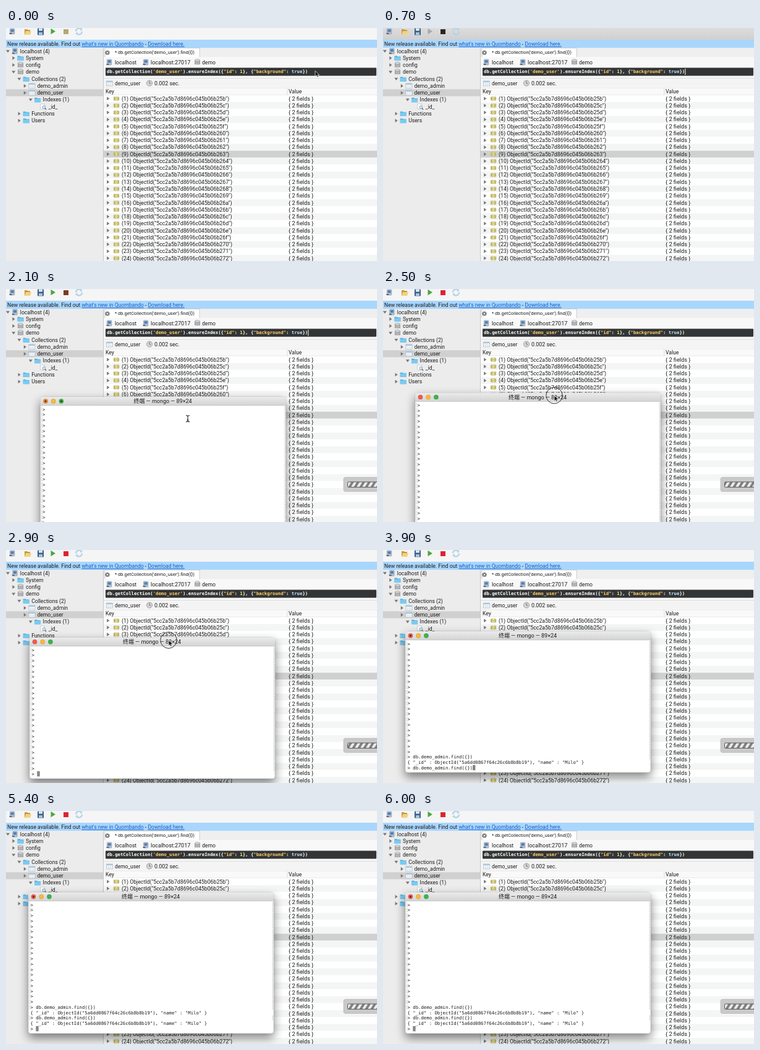
An HTML page that plays this animation: 600x378 px, repeating every 6.1 s.

```html
<!DOCTYPE html>
<html lang="en">
<head>
<meta charset="utf-8">
<style>
html, body { margin: 0; width: 100%; height: 100%; overflow: hidden; background: #fff; }
svg { display: block; width: 600px; height: 378px; }
text { font-family: Roboto, "Noto Sans CJK SC", "Noto Sans CJK", sans-serif; font-size: 8.6px; fill: #1c1c1c; white-space: pre; }
.mono { font-family: "DejaVu Sans Mono", monospace; font-size: 7.3px; }
.code { font-weight: bold; fill: #fff; }
.link { fill: #1560c8; text-decoration: underline; }
</style>
</head>
<body>
<svg id="stage" viewBox="0 0 600 378" xmlns="http://www.w3.org/2000/svg">
  <defs>
    <linearGradient id="bar" x2="0" y2="1"><stop stop-color="#ebebeb"/><stop offset="1" stop-color="#d3d3d3"/></linearGradient>
    <linearGradient id="active" x2="0" y2="1"><stop stop-color="#dcdcdc"/><stop offset="1" stop-color="#d0d0d0"/></linearGradient>
    <filter id="shadow" x="-20%" y="-20%" width="140%" height="150%"><feGaussianBlur stdDeviation="8"/></filter>
    <clipPath id="track"><rect x="552.5" y="313" width="60" height="8.5" rx="1.5"/></clipPath>
  </defs>
  <g id="app"></g>
  <g id="progress">
    <rect x="546" y="305.5" width="70" height="23" rx="3" fill="#c9c9c9" stroke="#b5b5b5" stroke-width=".7"/>
    <g clip-path="url(#track)">
      <rect x="552" y="312" width="60" height="11" fill="#ececec"/>
      <g id="stripes"></g>
    </g>
    <rect x="552.5" y="313" width="60" height="8.5" rx="1.5" fill="none" stroke="#5a5a5a"/>
  </g>
  <g id="term"></g>
  <g id="ibeam" fill="none" stroke="#222" stroke-width="1.1">
    <path d="M-3-5Q0-5 0-3Q0-5 3-5M0-3V4M-3 5.5Q0 5.5 0 3.5Q0 5.5 3 5.5M-1.5 2.5H1.5"/>
  </g>
  <g id="arrow">
    <circle id="ring" r="13.2" fill="none" stroke="#333" stroke-width="1"/>
    <path d="M0 0V9.2L2.2 7.2L3.6 10.4L5.2 9.7L3.8 6.6H6.7Z" fill="#111" stroke="#fff" stroke-width=".7"/>
  </g>
</svg>
<script>
const $ = id => document.getElementById(id);
const LOOP = 6100, PITCH = 11.26;

const rect = (x, y, w, h, fill, extra = '') =>
  `<rect x="${x}" y="${y}" width="${w}" height="${h}" fill="${fill}" ${extra}/>`;
const path = (d, fill, extra = '') => `<path d="${d}" fill="${fill}" ${extra}/>`;
const label = (x, y, s, size = 8.6, extra = '') =>
  `<text x="${x}" y="${y}" style="font-size:${size}px" ${extra}>${s}</text>`;
const at = (x, y, body) => `<g transform="translate(${x} ${y})">${body}</g>`;

// icons are drawn around their centre
const icon = {
  folder: () => path('M-5-3.5H-1L0-2.5H5V4H-5Z', '#55b4e6') + rect(-5, -1.5, 10, 5.5, '#7ccaf0'),
  host: () => rect(-3.6, -4.5, 7.5, 9, '#b4bfca', 'rx="1" stroke="#7d8894" stroke-width=".5"') +
    rect(-2.4, -3.2, 5, 4, '#4b80bd') + rect(-4.5, 2.5, 4, 2, '#566a80'),
  db: () => rect(-4, -3.2, 8, 7, '#c4c7c9') +
    '<ellipse cy="-3.2" rx="4" ry="1.5" fill="#e2e4e5" stroke="#777" stroke-width=".6"/>' +
    path('M-4-.5Q0 1.3 4-.5M-4 2Q0 3.8 4 2M-4-3V3.5M4-3V3.5', 'none', 'stroke="#777" stroke-width=".6"'),
  table: () => rect(-5, -4, 10, 8, '#fff', 'stroke="#a9b5bf" stroke-width=".7"') +
    rect(-5, -4, 10, 2.3, '#a5c8e4') +
    path('M-5 .5H5M-5 2.3H5M-1.7-1.7V4M1.7-1.7V4', 'none', 'stroke="#c4ced6" stroke-width=".5"'),
  index: () => rect(-4.5, -4.5, 6.5, 8, '#fff', 'stroke="#b0b7bd" stroke-width=".6"') +
    '<circle cx="1" cy=".8" r="2.4" fill="#d9eaf6" stroke="#6f8ea6" stroke-width=".8"/>' +
    path('M2.8 2.6L4.8 4.6', 'none', 'stroke="#555" stroke-width="1.2"'),
  doc: () => rect(-4.5, -2.8, 9, 5.6, '#ebe49a', 'rx="1" stroke="#a69f55" stroke-width=".5"') +
    path('M-1.8-1.7H-2.8V1.7H-1.8M1.8-1.7H2.8V1.7H1.8M-.7 0H.7', 'none', 'stroke="#6d6830" stroke-width=".7"'),
  clock: () => '<circle r="4.6" fill="#d4d4d4" stroke="#999" stroke-width=".9"/>' +
    path('M0-3V0L2 1', 'none', 'stroke="#555" stroke-width=".9"')
};
const put = (name, x, y) => at(x, y, icon[name]());
const twist = (x, y, open) =>
  at(x, y, path(open ? 'M-3-1.8H3L0 2.3Z' : 'M-1.8-3L2.3 0L-1.8 3Z', '#777'));

function toolbar() {
  return rect(0, 0, 600, 19, '#f5f5f5', 'id="tools"') +
    at(10, 5.5, icon.host()) +
    at(35, 6, path('M-5-4H-1L0-3H4V5H-5Z', '#c9983f') + path('M-5 5L-3-1H6L4 5Z', '#f2d27c')) +
    at(56, 6, rect(-5, -5.5, 10, 11, '#3c5f86', 'rx="1"') + rect(-3, -5.5, 6, 4, '#dfe9f2') + rect(-3, 1, 6, 4.5, '#a8c3dc')) +
    path('M72.5 .8L80 5.5L72.5 10.2Z', '#4aa83f', 'id="play"') +
    rect(93, 2, 8, 8, '#b5a874', 'id="stop"') +
    at(118, 5.5, path('M-5 0A5 5 0 0 1 3-4M5 0A5 5 0 0 1-3 4', 'none', 'stroke="#b3d3e8" stroke-width="2.2"') +
      path('M1-5.5L6-4L3-.5ZM-1 5.5L-6 4L-3 .5Z', '#b3d3e8')) +
    rect(0, 19, 600, 13.5, '#a9d6fd') +
    `<text x="2" y="29">New release available. Find out <tspan class="link">what's new in Quombando</tspan> - <tspan class="link">Download here.</tspan></text>`;
}

function tree() {
  // depth, open state (0 none, 1 closed, 2 open), icon, text
  const items = [
    [0, 2, 'host', 'localhost (4)'], [1, 1, 'folder', 'System'], [1, 1, 'db', 'config'],
    [1, 2, 'db', 'demo'], [2, 2, 'folder', 'Collections (2)'], [3, 1, 'table', 'demo_admin'],
    [3, 1, 'table', 'demo_user'], [4, 2, 'folder', 'Indexes (1)'], [5, 0, 'index', '_id_'],
    [2, 1, 'folder', 'Functions'], [2, 1, 'folder', 'Users']
  ];
  return rect(0, 32.5, 157.5, 346, '#ececec') + rect(0, 99.4, 157.5, 11.2, '#d0d0d0') +
    items.map(([d, open, name, s], i) => {
      const x = 3 + d * 9.2, y = 37.6 + i * PITCH;
      return (open ? twist(x, y, open > 1) : '') + put(name, x + 11.3, y) + label(x + 19.8, y + 3, s);
    }).join('') + rect(157, 32.5, 1, 346, '#c6c6c6');
}

function editor() {
  const str = s => `<tspan fill="#fed16d">${s}</tspan>`;
  return rect(158, 32.5, 442, 14.5, '#efefef') +
    rect(160, 32.5, 153, 15, '#fff', 'stroke="#bdbdbd" stroke-width=".7"') +
    at(164, 40, '<circle r="3.6" fill="#777"/>' + path('M-1.5-1.5L1.5 1.5M1.5-1.5L-1.5 1.5', 'none', 'stroke="#fff"')) +
    label(176, 42, "* db.getCollection('demo_user').find({})", 7.5) +
    rect(158, 47, 442, 34, '#f8f8f8') +
    put('host', 167, 55.5) + label(176, 58.5, 'localhost') +
    put('host', 226, 55.5) + label(234, 58.5, 'localhost:27017', 9) +
    put('db', 309.5, 55.5) + label(317, 58.5, 'demo') +
    rect(161, 64.6, 438, 12.8, '#333435', 'rx="1"') +
    `<text class="mono code" x="163" y="73.3">db.getCollection(${str("'demo_user'")}).ensureIndex({${str('"id"')}: <tspan fill="#dbf76c">1</tspan>}, {${str('"background"')}: <tspan fill="#bee5ff">true</tspan>})</text>` +
    rect(488.3, 66, 1, 10, '#fff', 'id="caret"') +
    rect(158, 81, 442, 16, '#f4f4f4') +
    rect(158, 81, 442, .7, '#d4d4d4') +
    put('table', 167.5, 90) + label(176, 92.8, 'demo_user', 8.4) +
    put('clock', 232, 89.5) + label(240, 92.8, '0.002 sec.', 8.9);
}

function results() {
  let out = rect(158, 97, 442, 281, '#fff') + rect(158, 97, 442, 12, '#f9f9f9') +
    rect(158, 96.7, 442, .6, '#cfcfcf') + rect(158, 108.6, 442, .6, '#d5d5d5') +
    rect(454.5, 98, .7, 10.5, '#cfcfcf') +
    label(161, 106, 'Key') + label(457, 106, 'Value');
  for (let i = 0; i < 24; i++) {
    const y = 114.6 + i * PITCH;
    const id = '5cc2a5b7d8696c045b06b' + (0x25b + i).toString(16);
    const tone = i === 8 ? '#d0d0d0' : i % 2 ? '#f4f5f5' : '#fff';
    out += rect(158, y - 5.6, 442, PITCH, tone) + twist(165, y, false) + put('doc', 178.5, y) +
      label(187, y + 3, `(${i + 1}) ObjectId("${id}")`, 8.75) + label(457, y + 3, '{ 2 fields }', 9.2);
  }
  return out;
}

// terminal, local origin at its top left corner
const ROWS = 24, CELL = 4.395, LINE = 8.75;
const rowY = r => 20 + r * LINE;

function terminal() {
  let out = rect(0, 7, 397, 229, '#000', 'rx="4" opacity=".5" filter="url(#shadow)"') +
    rect(0, 0, 397, 229, '#fff', 'rx="4" stroke="#a9a9a9" stroke-width=".6"') +
    path('M0 14V4Q0 0 4 0H393Q397 0 397 4V14Z', 'url(#bar)') + rect(0, 13.7, 397, .6, '#b7b7b7');
  ['#f9564f', '#fbb934', '#39b54a'].forEach((c, i) => {
    out += `<circle class="light" cx="${8.5 + i * 12.7}" cy="7" r="3.7" fill="${c}" stroke="#0003" stroke-width=".6"/>` +
      `<circle class="dot" cx="${8.5 + i * 12.7}" cy="7" r="1.5" fill="#4a2a12"/>`;
  });
  out += label(198, 10.3, '终端 — mongo — 89×24', 9, 'text-anchor="middle"');
  for (let r = 0; r < ROWS; r++) {
    const y = rowY(r);
    out += `<g class="mark">${path(`M3.5 ${y - 3.5}H2V${y + 3}H3.5M394 ${y - 3.5}H395.5V${y + 3}H394`, 'none', 'stroke="#bcbcbc" stroke-width=".6"')}</g>` +
      `<text class="mono row" x="3.5" y="${y + 2.6}"></text>`;
  }
  return out + rect(0, rowY(23) - 4.3, CELL, 8.4, '#858585', 'id="block"');
}

function stripes() {
  let out = '';
  for (let x = 535; x < 625; x += 9) {
    out += path(`M${x} 322L${x + 6} 312H${x + 10.5}L${x + 4.5} 322Z`, '#808080');
  }
  return out;
}

$('app').innerHTML = toolbar() + tree() + results() + editor();
$('term').innerHTML = terminal();
$('stripes').innerHTML = stripes();

const rows = [...document.querySelectorAll('.row')];
const marks = [...document.querySelectorAll('.mark')];
const dots = [...document.querySelectorAll('.dot')];
const lights = [...document.querySelectorAll('.light')];

const show = (el, on) => el.setAttribute('display', on ? 'inline' : 'none');
const fill = (el, color) => el.setAttribute('fill', color);
const move = (el, [x, y]) => el.setAttribute('transform', `translate(${x} ${y})`);

// keys: [time, x, y], linear in between
function along(keys, t) {
  if (t <= keys[0][0]) return keys[0].slice(1);
  for (let i = 1; i < keys.length; i++) {
    const [a, ax, ay] = keys[i - 1], [b, bx, by] = keys[i];
    if (t <= b) {
      const k = (t - a) / (b - a);
      return [ax + (bx - ax) * k, ay + (by - ay) * k];
    }
  }
  return keys[keys.length - 1].slice(1);
}

const WINDOW = [[2400, 55.5, 175], [2900, 38, 142], [3100, 36, 132]];
const BEAM = [[1900, 300, 218], [2100, 294, 210], [2300, 280.5, 179]];
const CMD = 'db.demo_admin.find({})';
const REPLY = '{ "_id" : ObjectId("5a6dd0867f64c26c6b8b8b19"), "name" : "Milo" }';

function screen(t) {
  const runs = t >= 4300 ? 2 : t >= 3500 ? 1 : 0;
  const typed = (t >= 3300 && t < 3500) || (t >= 3800 && t < 4300) ? CMD : '';
  const tail = [];
  for (let i = 0; i < runs; i++) tail.push('> ' + CMD, REPLY);
  tail.push('> ' + typed);
  return [...Array(ROWS - tail.length).fill('> '), ...tail];
}

function draw(now) {
  const t = Math.floor((now % LOOP) / 100) * 100;

  // the editor window has the focus until the terminal comes up
  const focus = t >= 600 && t < 1800;
  fill($('tools'), focus ? 'url(#active)' : '#f5f5f5');
  fill($('play'), focus ? '#a9aaa8' : '#4aa83f');
  fill($('stop'), t < 600 ? '#b5a874' : focus ? '#2b2422' : t < 2300 ? '#7b3b23' : '#dc2433');
  show($('caret'), t >= 600 && t < 2400);
  show($('progress'), t >= 1100);
  move($('stripes'), [(t * 0.03) % 9, 0]);

  const win = along(WINDOW, t);
  show($('term'), t >= 1800);
  move($('term'), win);
  const lines = screen(t);
  rows.forEach((el, i) => {
    if (el.textContent !== lines[i]) el.textContent = lines[i];
    show(marks[i], lines[i][0] === '>' && i < ROWS - 1);
  });
  $('block').setAttribute('x', 3.5 + lines[ROWS - 1].length * CELL);
  fill(lights[0], t < 2400 ? '#f08a2c' : '#f9564f');
  dots.forEach((el, i) => show(el, t < 2400 ? i !== 1 : t >= 3200 && i === 0));

  const drag = t >= 2400 && t < 3200;
  show($('arrow'), t < 600 || drag);
  show($('ring'), drag);
  move($('arrow'), drag ? [win[0] + 225, win[1] + 4.3] : [500, 69.5]);
  show($('ibeam'), t >= 1900 && t < 2400);
  move($('ibeam'), along(BEAM, t));
}

const start = performance.now();
function tick() {
  draw(performance.now() - start);
  requestAnimationFrame(tick);
}
tick();
</script>
</body>
</html>
```
